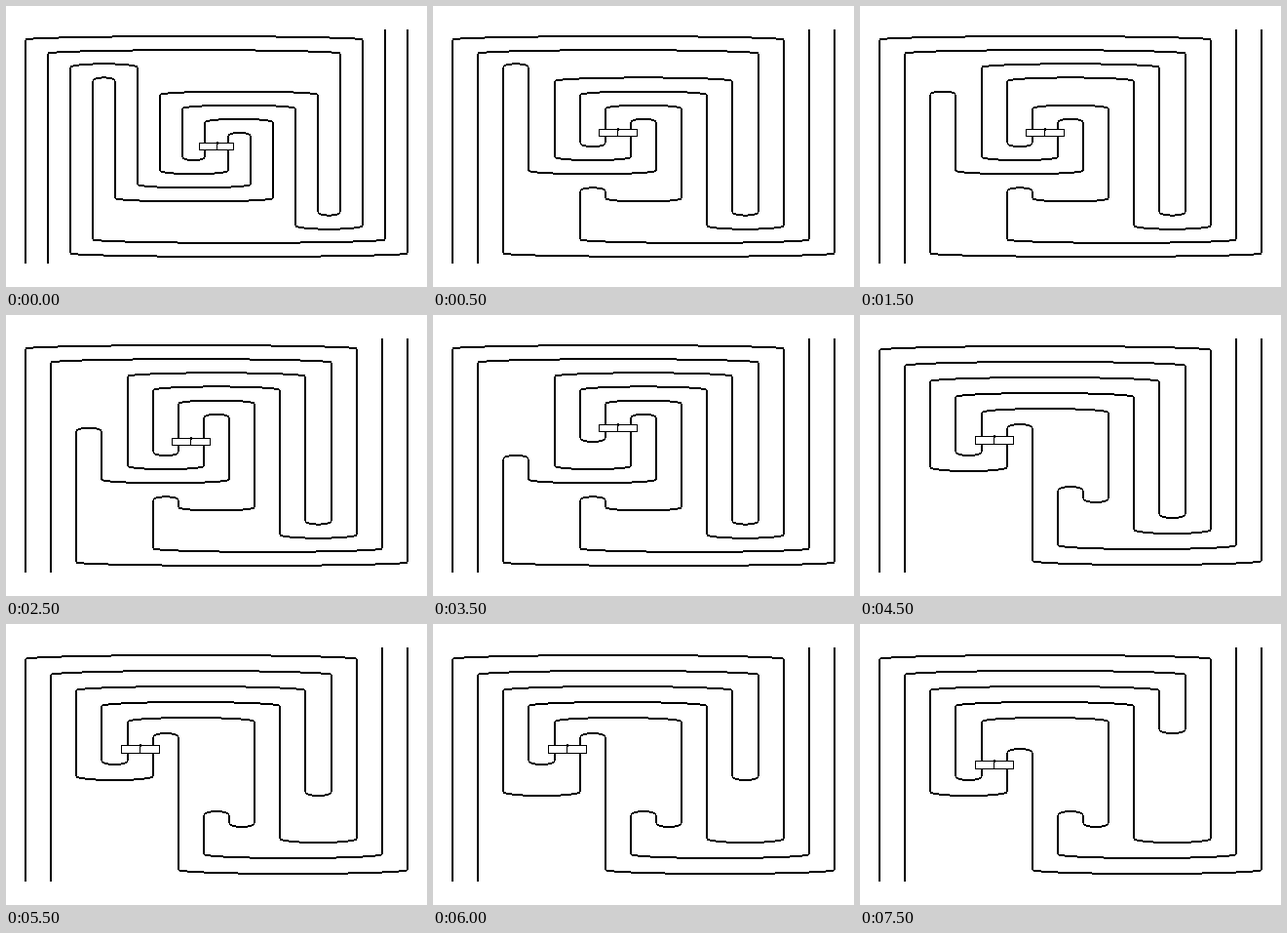
Write an HTML page with a canvas that moves like this. It is 432 px wide and 288 px high and loops after 8 s.

```html
<!DOCTYPE html>
<html>
<head>
<meta charset="utf-8">
<title>Sliding meander</title>
<style>
  html, body { margin: 0; width: 100%; height: 100%; overflow: hidden; background: #fff; }
  canvas { display: block; }
</style>
</head>
<body>
<canvas id="stage" width="432" height="288"></canvas>
<script>
const LEFT = 20, RIGHT = 412, TOP = 24, BOTTOM = 264, STEP = 500;

// Rows from top to bottom: n = cap, u = cup, b = box, each joining two columns.
// swaps: rows exchanged with the next one, one per step.
const phases = [
  { cols: 18, swaps: [], rows:
    'n0-15 n1-14 n2-5 n3-4 n6-13 n7-12 n8-11 n9-10 b8-9 ' +
    'u7-8 u6-9 u5-10 u4-11 u13-14 u12-15 u3-16 u2-17' },
  { cols: 16, swaps: [2, 3, 4, 5, 6, 7], rows:
    'n0-13 n1-12 n2-3 n4-11 n5-10 n6-9 n7-8 b6-7 u5-6 ' +
    'u4-7 u3-8 n5-6 u6-9 u11-12 u10-13 u5-14 u2-15' },
  { cols: 14, swaps: [], rows:
    'n0-11 n1-10 n2-9 n3-8 n4-7 n5-6 b4-5 u3-4 u2-5 ' +
    'n3-4 u4-6 n4.5-5.5 u5.5-7 u9-10 u8-11 u4.5-12 u3-13' },
  { cols: 16, swaps: [10, 9, 8, 7, 6, 5], rows:
    'n0-13 n1-12 n2-11 n3-10 n4-9 n5-6 b4-5 u3-4 u2-5 ' +
    'n7-8 u8-9 u11-12 u10-13 u7-14 u6-15' }
];

function parseRow(text) {
  const [a, b] = text.slice(1).split('-').map(Number);
  return { kind: text[0], a, b };
}

const states = phases.flatMap(({ cols, swaps, rows }) => {
  const list = rows.split(' ').map(parseRow);
  const result = [{ cols, rows: [...list] }];
  for (const i of swaps) {
    [list[i], list[i + 1]] = [list[i + 1], list[i]];
    result.push({ cols, rows: [...list] });
  }
  return result;
});

const ctx = document.getElementById('stage').getContext('2d');

function vertical(x, from, to) {
  const y = Math.round(from);
  ctx.fillRect(Math.round(x) - 1, y, 2, Math.round(to) - y);
}

// Half ellipse drawn pixel by pixel to keep hard edges.
function arc(xa, xb, base, rise) {
  const a = Math.round(xa), b = Math.round(xb);
  const mid = (a + b) / 2, radius = (b - a) / 2;
  for (let x = a; x < b; x++) {
    const u = (x + 0.5 - mid) / radius;
    const y = Math.round(base + rise * Math.sqrt(1 - u * u));
    ctx.fillRect(x, y - 1, 1, 2);
  }
}

function box(xa, xb, y, padX, padY) {
  const x0 = Math.floor(xa - padX + 0.01), x1 = Math.floor(xb + padX);
  const y0 = Math.floor(y - padY), y1 = Math.floor(y + padY);
  const mid = Math.floor((xa + xb) / 2);
  ctx.fillRect(x0, y0, x1 - x0 + 1, y1 - y0 + 1);
  ctx.fillStyle = '#fff';
  ctx.fillRect(x0 + 1, y0 + 1, x1 - x0 - 1, y1 - y0 - 1);
  ctx.fillStyle = '#000';
  ctx.fillRect(mid, y0, 1, y1 - y0);
  ctx.fillRect(mid, y0 - 1, 2, 3);
}

function draw({ cols, rows }) {
  const dx = (RIGHT - LEFT) / (cols - 1);
  const dy = (BOTTOM - TOP) / rows.length;
  const colX = c => LEFT + c * dx;
  const open = new Map([[cols - 2, TOP], [cols - 1, TOP]]);
  const boxes = [];

  ctx.fillStyle = '#fff';
  ctx.fillRect(0, 0, 432, 288);
  ctx.fillStyle = '#000';

  rows.forEach(({ kind, a, b }, i) => {
    const y = TOP + (i + 0.5) * dy;
    const xa = colX(a), xb = colX(b);
    if (kind === 'b') {
      boxes.push([xa, xb, y, dx / 4, dy / 4]);
    } else if (kind === 'n') {
      arc(xa, xb, y + dy / 4, -dy / 4);
      open.set(a, y + dy / 4).set(b, y + dy / 4);
    } else {
      arc(xa, xb, y - dy / 4, dy / 4);
      for (const c of [a, b]) {
        vertical(colX(c), open.get(c), y - dy / 4);
        open.delete(c);
      }
    }
  });
  open.forEach((y, c) => vertical(colX(c), y, BOTTOM));
  boxes.forEach(args => box(...args));
}

const start = performance.now();
let shown = -1;

function tick() {
  const index = Math.floor((performance.now() - start) / STEP) % states.length;
  if (index !== shown) draw(states[shown = index]);
  requestAnimationFrame(tick);
}
tick();
</script>
</body>
</html>
```
